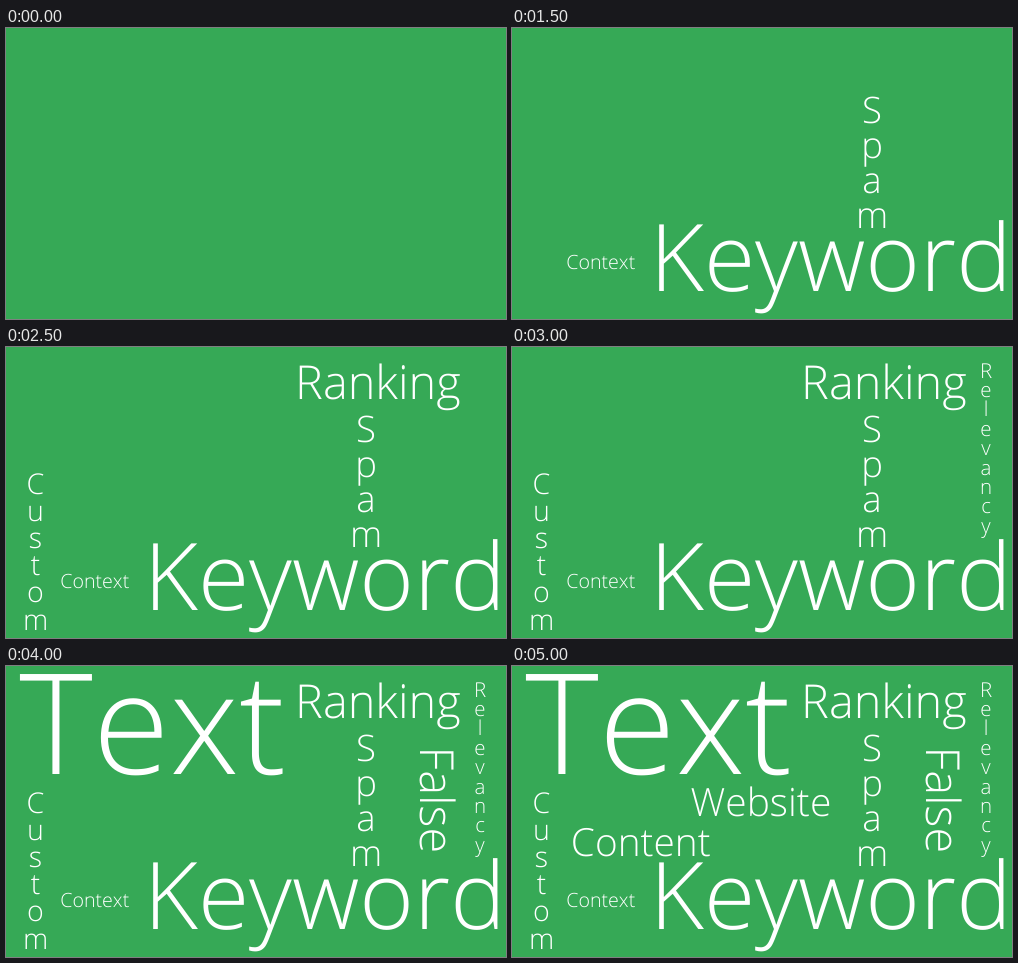
An HTML page with a canvas that plays this animation: 500x291 px, repeating every 5.5 s.

```html
<!DOCTYPE html>
<html lang="en">
<head>
<meta charset="utf-8">
<title>Word cloud</title>
<style>
  html, body { margin: 0; width: 100%; height: 100%; overflow: hidden; background: #36a956; }
  canvas { display: block; width: 500px; height: 291px; }
</style>
</head>
<body>
<canvas id="stage" width="500" height="291"></canvas>
<script>
const ctx = document.getElementById('stage').getContext('2d');
const STEP = 500, LOOP = 5500;

function setFont(size) {
  ctx.font = `300 ${size}px "Open Sans", "Noto Sans", sans-serif`;
  ctx.textRendering = 'geometricPrecision';
  ctx.fontKerning = 'none';
}

// Picks the font size whose ink spans `span`, and starts the ink at x.
function line(text, x, baseline, span, turn = 0) {
  setFont(200);
  ctx.textAlign = 'left';
  const m = ctx.measureText(text);
  const ink = m.actualBoundingBoxRight + m.actualBoundingBoxLeft;
  const k = span / ink;
  setFont(200 * k);
  ctx.save();
  ctx.translate(x, baseline);
  ctx.rotate(turn);
  ctx.fillText(text, m.actualBoundingBoxLeft * k, 0);
  ctx.restore();
}

// Upright letters stacked downwards, centred on x.
function stack(text, x, baseline, size, pitch) {
  setFont(size);
  ctx.textAlign = 'center';
  [...text].forEach((ch, i) => ctx.fillText(ch, x, baseline + i * pitch));
}

// One word appears per step.
const words = [
  () => line('Keyword', 147, 263, 345),
  () => line('Context', 55.4, 240.5, 67.4),
  () => stack('Spam', 360, 95, 36.5, 34.9),
  () => line('Ranking', 293.8, 51.8, 160),
  () => stack('Custom', 29.5, 147, 28.6, 27.1),
  () => stack('Relevancy', 474, 30.5, 20.5, 19.4),
  () => line('Text', 13.3, 108.3, 263.4),
  () => line('False', 413.6, 85.3, 99.4, Math.PI / 2),
  () => line('Content', 61.2, 189.5, 136.5),
  () => line('Website', 179.3, 150.3, 137.9)
];

let shown = -1;
const start = performance.now();

function frame() {
  const t = (performance.now() - start) % LOOP;
  const count = Math.floor(t / STEP);
  if (count !== shown) {
    shown = count;
    ctx.fillStyle = '#36a956';
    ctx.fillRect(0, 0, 500, 291);
    ctx.fillStyle = '#fff';
    words.slice(0, count).forEach(draw => draw());
  }
  requestAnimationFrame(frame);
}
frame();
</script>
</body>
</html>
```
